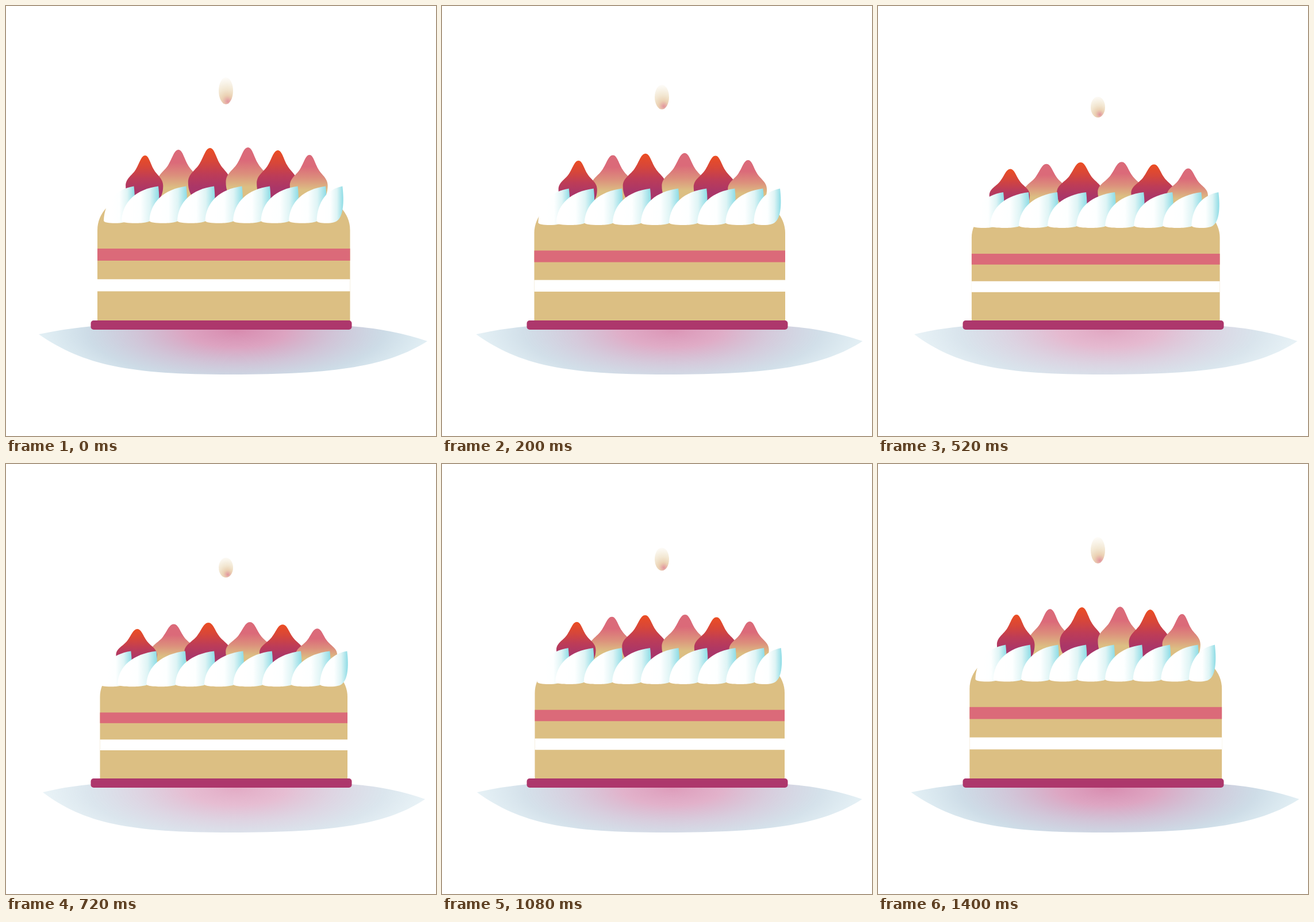
Animation, 748 px wide and 748 px high, one loop 1.44 s. Source, as an HTML page with a canvas:

```html
<!DOCTYPE html>
<html lang="en">
<head>
<meta charset="utf-8">
<title>Strawberry cake</title>
<style>
  html, body { margin: 0; width: 100%; height: 100%; overflow: hidden; background: #fff; }
  canvas { display: block; width: 748px; height: 748px; }
</style>
</head>
<body>
<canvas id="stage" width="748" height="748"></canvas>
<script>
const ctx = document.getElementById('stage').getContext('2d');
const LOOP = 1440, STEP = 40, CREAMS = 9;
const TAN = '#dcbf83', PINK = '#db6a79', BERRY = '#ad376c';
const RED_SHADES = ['#ec4d22', '#d74639', '#bd3c57', '#aa3668', '#a7356b'];
const PINK_SHADES = [PINK, PINK, '#dc8f7c', TAN, TAN];
const CREAM_SHADES = ['#fff', '#fff', '#fdffff', '#def4f5', '#8adbe5'];

let squash = 0;  // 0 = tall, 1 = flat
const mix = (tall, flat) => tall + (flat - tall) * squash;

// Fills the current path with evenly spaced colours
function fillGradient(gradient, colors) {
  colors.forEach((color, i) => gradient.addColorStop(i / (colors.length - 1), color));
  ctx.fillStyle = gradient;
  ctx.fill();
}

// Cubic from 0 to 1 with the given slopes at its two ends
function ease(x, start, end) {
  return start * x * (1 - x) ** 2 + x * x * (3 - 2 * x) - end * x * x * (1 - x);
}

function squashAt(ms) {
  const x = ms / (LOOP / 2);
  return x < 1 ? ease(x, 1, 0) : 1 - ease(x - 1, 1, 1.4);
}

function drawPlate() {
  const left = mix(57, 64), right = mix(733, 729);
  ctx.save();
  ctx.globalAlpha = mix(1, 0.72);
  ctx.beginPath();
  ctx.moveTo(left, 571);
  ctx.quadraticCurveTo(105, 561, 150, 557);
  ctx.lineTo(600, 557);
  ctx.quadraticCurveTo(670, 562, right, 583);
  ctx.bezierCurveTo(665, 626, 575, 641, 390, 641);
  ctx.bezierCurveTo(215, 641, 135, 625, left, 571);
  ctx.translate(400, 565);
  ctx.scale(345, 115);
  fillGradient(ctx.createRadialGradient(0, 0, 0, 0, 0, 1), [
    'rgba(186,48,112,.56)', 'rgba(180,56,120,.46)', 'rgba(122,88,142,.35)',
    'rgba(70,125,165,.27)', 'rgba(62,150,185,.14)'
  ]);
  ctx.restore();
}

function drawFlame() {
  const top = mix(124, 163), bottom = mix(171, 197.5), h = bottom - top;
  ctx.beginPath();
  ctx.ellipse(382.5, (top + bottom) / 2, 12.5, h / 2, 0, 0, 2 * Math.PI);
  fillGradient(ctx.createRadialGradient(386, bottom - 5, 0, 384, bottom - 8, h * 0.85), [
    'rgba(214,100,116,.7)', 'rgba(219,172,118,.55)', 'rgba(219,185,125,.35)',
    'rgba(219,189,128,.18)', 'rgba(219,189,128,.02)'
  ]);
}

// Higher tips belong to bigger berries
function drawBerry(x, y, shades) {
  const h = (361 - y) / 2;
  ctx.beginPath();
  for (const w of [-0.67 * h, 0.62 * h]) {
    ctx.moveTo(x, y);
    ctx.bezierCurveTo(x + 0.2 * w, y, x + 0.28 * w, y + 0.26 * h, x + 0.47 * w, y + 0.47 * h);
    ctx.bezierCurveTo(x + 0.66 * w, y + 0.69 * h, x + w, y + 0.78 * h, x + w, y + 1.05 * h);
    ctx.bezierCurveTo(x + w, y + 1.5 * h, x + 0.6 * w, y + 1.7 * h, x, y + 1.7 * h);
  }
  fillGradient(ctx.createLinearGradient(0, y, 0, y + 1.6 * h), shades);
}

function drawBerries() {
  ctx.save();
  ctx.translate(385, 440);
  ctx.scale(mix(1, 1.0945), mix(1, 0.85));
  ctx.translate(-385, -440);
  drawBerry(300, 250, PINK_SHADES);
  drawBerry(242, 260, RED_SHADES);
  drawBerry(355, 247, RED_SHADES);
  drawBerry(421, 246, PINK_SHADES);
  drawBerry(473, 251, RED_SHADES);
  drawBerry(528, 259, PINK_SHADES);
  ctx.restore();
}

function drawBody() {
  const left = mix(159, 163.5), width = mix(598.5, 594) - left;
  const top = mix(334, 353), radius = mix(56, 52);
  const band = (y1, y2, color) => {
    ctx.fillStyle = color;
    ctx.fillRect(left, y1, width, y2 - y1);
  };
  ctx.fillStyle = TAN;
  ctx.beginPath();
  ctx.roundRect(left, top, width, 552 - top, [radius, radius, 0, 0]);
  ctx.fill();
  band(mix(422, 432.3), mix(443, 450.8), PINK);
  band(mix(475.3, 479.3), mix(496.3, 498), '#fff');
}

function drawCream(a, w) {
  const b = a + w, top = mix(313.5, 325.5), base = mix(377.5, 387), h = base - top;
  ctx.beginPath();
  ctx.moveTo(a, base - 4);
  ctx.bezierCurveTo(a + 0.03 * w, base - 0.58 * h, a + 0.4 * w, top + 0.08 * h, b, top);
  ctx.bezierCurveTo(b + 3, top + 0.4 * h, b + 3, base - 0.06 * h, b - 0.35 * w, base - 1);
  ctx.bezierCurveTo(b - 0.5 * w, base + 1, a, base + 1, a, base - 4);
  fillGradient(ctx.createLinearGradient(a, 0, b + 2, 0), CREAM_SHADES);
}

// Evenly piped, with narrower dollops at both ends
function drawCreams() {
  const first = mix(201, 194), pitch = mix(48.5, 50.3), width = mix(64, 67.5);
  drawCream(first - mix(31, 32), width * 0.82);
  for (let i = 0; i < CREAMS - 1; i++) {
    drawCream(first + i * pitch, i < CREAMS - 2 ? width : width * 0.7);
  }
}

function drawBase() {
  ctx.fillStyle = BERRY;
  ctx.beginPath();
  ctx.roundRect(147.5, 547, 454, 16, 5);
  ctx.fill();
}

function draw() {
  const ms = performance.now() % LOOP;
  squash = squashAt(Math.floor(ms / STEP) * STEP);
  ctx.clearRect(0, 0, 748, 748);
  drawPlate();
  drawFlame();
  drawBerries();
  drawBody();
  drawCreams();
  drawBase();
  requestAnimationFrame(draw);
}
draw();
</script>
</body>
</html>
```
